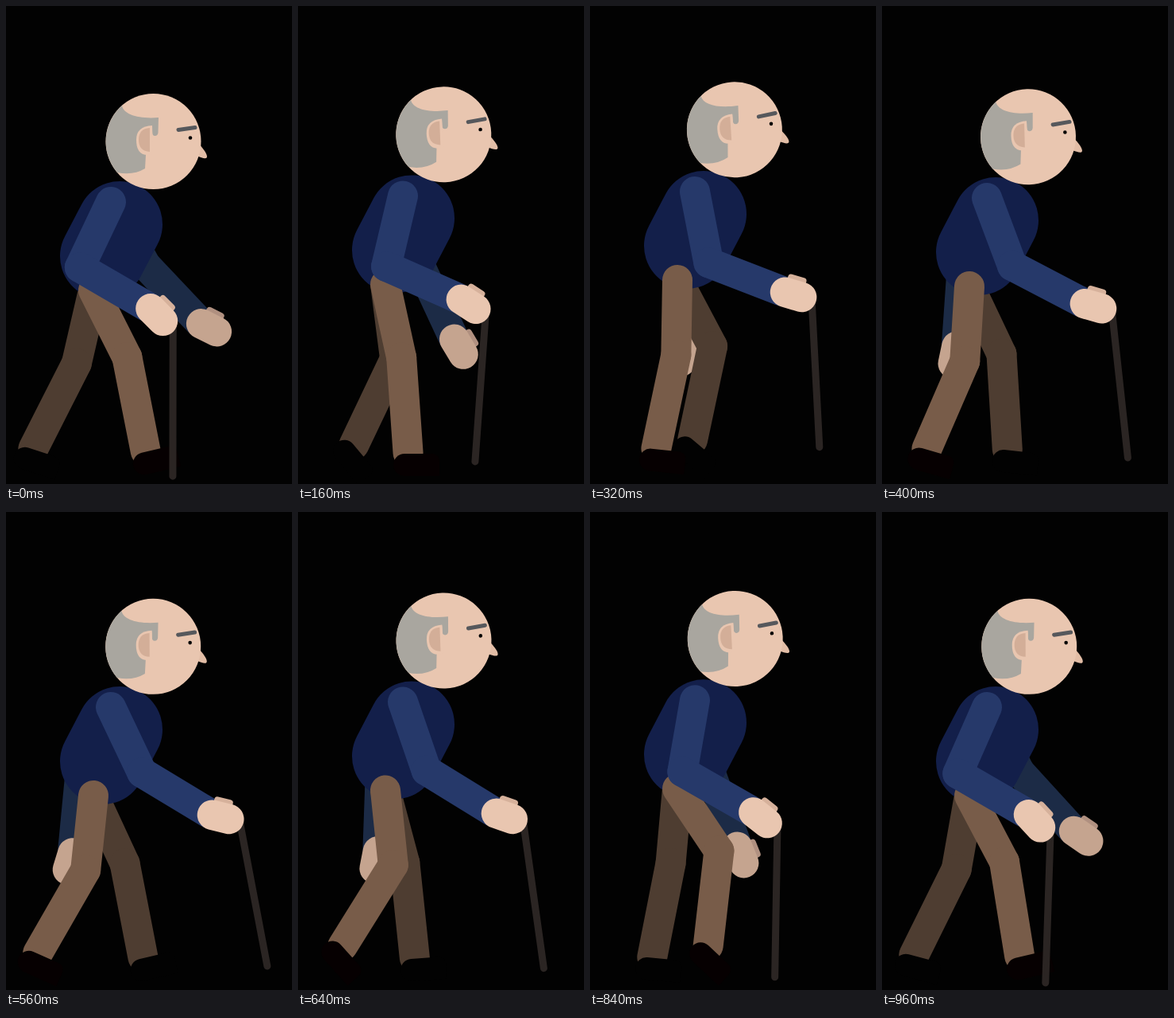
An HTML page without scripts that plays this animation: 360x600 px, repeating every 1 s.

```html
<!DOCTYPE html>
<html lang="en">
<head>
<meta charset="utf-8">
<title>Walk cycle</title>
<style>
html, body { margin: 0; height: 100%; overflow: hidden; background: #020202; }
svg { display: block; width: 100vw; height: 100vh; }

/* Limbs hang along +y from their joint; every joint turns relative to its parent. */
.limb { fill: none; stroke-width: 38; stroke-linecap: round; }
.palm { fill: none; stroke-width: 37.5; stroke-linecap: round; }
g { transform-origin: 0 0; animation: 1s steps(2) infinite; }
.arm { translate: 132px 246px; }
.fore { translate: 0 91px; }
.hand { translate: 0 103px; }
.back .hand { translate: 0 101px; }
.cane { translate: 7.8px 32.3px; }
.leg { translate: 110px 357px; }
.shin { translate: 0 94px; }
.foot { translate: 0 128px; }
#head { transform-origin: 157px 227px; }

.front .arm .limb { stroke: #26396a; }
.front .leg .limb { stroke: #785c49; }
.front .palm { stroke: #e9c6b0; }
.front .thumb { fill: #d6b19b; }
.front .shoe { fill: #060001; }
.back .arm .limb { stroke: #1c2b46; }
.back .leg .limb { stroke: #4e3d31; }
.back .palm { stroke: #c5a48f; }
.back .thumb { fill: #b09080; }
.back .shoe { fill: #020202; }

#body { animation-name: bob; }
#head { animation-name: nod; }
.front .arm { animation-name: arm; }
.front .fore { animation-name: fore; }
.front .hand { animation-name: hand; }
.front .cane { animation-name: cane; }
.front .leg { animation-name: leg; }
.front .shin { animation-name: shin; }
.front .foot { animation-name: foot; }
.back .arm { animation-name: arm2; }
.back .fore { animation-name: fore2; }
.back .hand { animation-name: hand2; }
.back .leg { animation-name: leg2; }
.back .shin { animation-name: shin2; }
.back .foot { animation-name: foot2; }

/* One step every 40 ms; longer or shorter spans set their own step count. */
@keyframes bob {
  0%, 100% { translate: 0 0 } 8% { translate: 0 -2px } 16% { translate: 0 -7.6px }
  24% { translate: 0 -14px } 32% { translate: 0 -13px } 40% { translate: 0 -5px }
  48% { translate: 0 0 } 56% { translate: 0 -1px }
  64% { translate: 0 -7.5px; animation-timing-function: steps(3) }
  76% { translate: 0 -15px; animation-timing-function: steps(3) }
  88% { translate: 0 -7px } 96% { translate: 0 -1px; animation-timing-function: steps(1) }
}
@keyframes nod {
  0%, 100% { rotate: 0deg } 8% { rotate: -.6deg } 16% { rotate: -2.2deg }
  24% { rotate: -4deg } 32% { rotate: -3.6deg } 40% { rotate: -1.5deg }
  48% { rotate: 0deg } 56% { rotate: -.3deg }
  64% { rotate: -2deg; animation-timing-function: steps(3) }
  76% { rotate: -4.3deg; animation-timing-function: steps(3) }
  88% { rotate: -2deg } 96% { rotate: -.3deg; animation-timing-function: steps(1) }
}
@keyframes arm {
  0%, 100% { rotate: 25.5deg } 8% { rotate: 22deg } 16% { rotate: 13.3deg }
  24% { rotate: .5deg } 32% { rotate: -11deg } 40% { rotate: -20.6deg }
  48% { rotate: -25deg } 56% { rotate: -25.5deg }
  64% { rotate: -19deg; animation-timing-function: steps(3) }
  76% { rotate: -2.3deg; animation-timing-function: steps(3) }
  88% { rotate: 16deg } 96% { rotate: 23.8deg; animation-timing-function: steps(1) }
}
@keyframes fore {
  0%, 100% { rotate: -85.4deg } 8% { rotate: -85deg } 16% { rotate: -79.6deg }
  24% { rotate: -73.5deg } 32% { rotate: -58deg } 40% { rotate: -41.9deg }
  48% { rotate: -35deg } 56% { rotate: -33.5deg }
  64% { rotate: -39.5deg; animation-timing-function: steps(3) }
  76% { rotate: -57.7deg; animation-timing-function: steps(3) }
  88% { rotate: -76.5deg } 96% { rotate: -83.8deg; animation-timing-function: steps(1) }
}
@keyframes hand {
  0%, 100% { rotate: 15deg } 8% { rotate: 13deg } 16% { rotate: 9.3deg }
  24% { rotate: 2deg } 32% { rotate: -4.5deg } 40% { rotate: -11.5deg }
  48% { rotate: -16deg } 56% { rotate: -17deg }
  64% { rotate: -12.5deg; animation-timing-function: steps(3) }
  76% { rotate: 1deg; animation-timing-function: steps(3) }
  88% { rotate: 12.5deg } 96% { rotate: 17deg; animation-timing-function: steps(1) }
}
@keyframes cane {
  0%, 100% { rotate: 45deg } 8% { rotate: 52.5deg } 16% { rotate: 61.1deg }
  24% { rotate: 71.6deg } 32% { rotate: 70.5deg } 40% { rotate: 67.8deg }
  48% { rotate: 67deg } 56% { rotate: 65.2deg }
  64% { rotate: 63deg; animation-timing-function: steps(3) }
  76% { rotate: 58deg; animation-timing-function: steps(3) }
  88% { rotate: 50deg } 96% { rotate: 44.9deg; animation-timing-function: steps(1) }
}
@keyframes leg {
  0%, 100% { rotate: -26.8deg } 8% { rotate: -20deg } 16% { rotate: -12.4deg }
  24% { rotate: -2.5deg } 32% { rotate: 1deg } 40% { rotate: 3.5deg }
  48% { rotate: 5.5deg } 56% { rotate: 6deg }
  64% { rotate: -6deg; animation-timing-function: steps(3) }
  76% { rotate: -33.7deg; animation-timing-function: steps(3) }
  88% { rotate: -34deg } 96% { rotate: -27.9deg; animation-timing-function: steps(1) }
}
@keyframes shin {
  0%, 100% { rotate: 15.6deg } 8% { rotate: 11.5deg } 16% { rotate: 8.4deg }
  24% { rotate: 2.7deg } 32% { rotate: 11deg } 40% { rotate: 20deg }
  48% { rotate: 22.5deg } 56% { rotate: 24deg }
  64% { rotate: 38deg; animation-timing-function: steps(3) }
  76% { rotate: 57.4deg; animation-timing-function: steps(3) }
  88% { rotate: 32deg } 96% { rotate: 18.7deg; animation-timing-function: steps(1) }
}
@keyframes foot {
  0%, 100% { rotate: -2deg } 8% { rotate: 4.5deg } 16% { rotate: 4deg }
  24% { rotate: 0deg } 32% { rotate: -6deg } 40% { rotate: -7.5deg }
  48% { rotate: -8deg } 56% { rotate: -6deg }
  64% { rotate: 16deg; animation-timing-function: steps(3) }
  76% { rotate: 66deg; animation-timing-function: steps(3) }
  88% { rotate: 22deg } 96% { rotate: -4deg; animation-timing-function: steps(1) }
}
@keyframes arm2 {
  0%, 100% { rotate: -29deg } 8% { rotate: -24deg } 16% { rotate: -14deg }
  24% { rotate: -3deg } 32% { rotate: 9deg } 40% { rotate: 20deg }
  48% { rotate: 25deg } 56% { rotate: 25deg }
  64% { rotate: 18deg; animation-timing-function: steps(3) }
  76% { rotate: 0deg; animation-timing-function: steps(3) }
  88% { rotate: -18deg } 96% { rotate: -27deg; animation-timing-function: steps(1) }
}
@keyframes fore2 {
  0%, 100% { rotate: -14.5deg } 8% { rotate: -12deg } 16% { rotate: -11deg }
  24% { rotate: -1deg } 32% { rotate: -8deg } 40% { rotate: -16deg }
  48% { rotate: -19.5deg } 56% { rotate: -19.5deg }
  64% { rotate: -16deg; animation-timing-function: steps(3) }
  76% { rotate: -6deg; animation-timing-function: steps(3) }
  88% { rotate: -9deg } 96% { rotate: -15.5deg; animation-timing-function: steps(1) }
}
@keyframes hand2 {
  0%, 100% { rotate: -20deg } 8% { rotate: -12deg } 16% { rotate: -6deg }
  24% { rotate: -6deg } 32% { rotate: 1deg } 40% { rotate: 8deg }
  48% { rotate: 11.5deg } 56% { rotate: 11.5deg }
  64% { rotate: 9deg; animation-timing-function: steps(3) }
  76% { rotate: 6deg; animation-timing-function: steps(3) }
  88% { rotate: -6deg } 96% { rotate: -13deg; animation-timing-function: steps(1) }
}
@keyframes leg2 {
  0%, 100% { rotate: 13deg } 8% { rotate: 4deg } 16% { rotate: -7.4deg }
  24% { rotate: -21.6deg } 32% { rotate: -28deg } 40% { rotate: -25.5deg }
  48% { rotate: -26.5deg } 56% { rotate: -24.9deg }
  64% { rotate: -15deg; animation-timing-function: steps(3) }
  76% { rotate: 1.5deg; animation-timing-function: steps(3) }
  88% { rotate: 7deg } 96% { rotate: 10deg; animation-timing-function: steps(1) }
}
@keyframes shin2 {
  0%, 100% { rotate: 14deg } 8% { rotate: 23deg } 16% { rotate: 32.9deg }
  24% { rotate: 45.6deg } 32% { rotate: 40deg } 40% { rotate: 22deg }
  48% { rotate: 16.5deg } 56% { rotate: 13.9deg }
  64% { rotate: 9deg; animation-timing-function: steps(3) }
  76% { rotate: 0deg; animation-timing-function: steps(3) }
  88% { rotate: 9deg } 96% { rotate: 16.4deg; animation-timing-function: steps(1) }
}
@keyframes foot2 {
  0%, 100% { rotate: -9deg } 8% { rotate: 5deg } 16% { rotate: 24.5deg }
  24% { rotate: 54deg } 32% { rotate: 28deg } 40% { rotate: 9.5deg }
  48% { rotate: 0deg } 56% { rotate: -2deg }
  64% { rotate: 2deg; animation-timing-function: steps(3) }
  76% { rotate: -1.5deg; animation-timing-function: steps(3) }
  88% { rotate: -8deg } 96% { rotate: -11.4deg; animation-timing-function: steps(1) }
}
</style>
</head>
<body>
<svg viewBox="0 0 360 600">
  <defs>
    <path id="upper" d="M0 0V91"/>
    <path id="lower" d="M0 0V98"/>
    <path id="thigh" d="M0 0V94"/>
    <path id="calf" d="M0 0V120"/>
    <path id="palm" d="M0 0V22"/>
    <rect id="thumb" x="10" y="-2" width="14" height="24" rx="4"/>
    <path id="shoe" d="M-5-7H29Q39-7 39 4V21H-5A14 14 0 0 1-5-7Z"/>
  </defs>
  <g id="body">
    <g class="back">
      <g class="arm">
        <use href="#upper" class="limb"/>
        <g class="fore">
          <use href="#lower" class="limb"/>
          <g class="hand">
            <use href="#thumb" class="thumb"/>
            <use href="#palm" class="palm"/>
          </g>
        </g>
      </g>
      <g class="leg">
        <use href="#thigh" class="limb"/>
        <g class="shin">
          <use href="#calf" class="limb"/>
          <g class="foot"><use href="#shoe" class="shoe"/></g>
        </g>
      </g>
    </g>

    <path d="M143 274L122 314" stroke="#131f4a" stroke-width="108" stroke-linecap="round"/>

    <g id="head">
      <path d="M243 173C248 179 253 185 253 189C253 193 247 191 240 188Z" fill="#e2bda6"/>
      <circle cx="185.5" cy="170" r="60" fill="#e9c6b0"/>
      <path d="M146 125C148 136 166 142 192 140L191.5 159Q191 163 187.5 163Q184 163 184 158V150L176 187L175 204Q160 213 140 209A60 60 0 0 1 146 125Z" fill="#a9a69f"/>
      <path d="M184 150Q164 151 164 168Q164 186 177 187L185 186Z" fill="#e9c6b0"/>
      <path d="M181 153Q167 154 167 168Q167 182 181 183Z" fill="#d3ae98"/>
      <path d="M217 155.500L238 152.500" stroke="#56585c" stroke-width="5" stroke-linecap="round"/>
      <circle cx="232" cy="165.500" r="2.300"/>
    </g>

    <g class="front">
      <g class="leg">
        <use href="#thigh" class="limb"/>
        <g class="shin">
          <use href="#calf" class="limb"/>
          <g class="foot"><use href="#shoe" class="shoe"/></g>
        </g>
      </g>
      <g class="arm">
        <use href="#upper" class="limb"/>
        <g class="fore">
          <use href="#lower" class="limb"/>
          <g class="hand">
            <g class="cane"><path d="M0 0V193" stroke="#2b2523" stroke-width="9" stroke-linecap="round"/></g>
            <use href="#thumb" class="thumb"/>
            <use href="#palm" class="palm"/>
          </g>
        </g>
      </g>
    </g>
  </g>
</svg>
</body>
</html>
```
